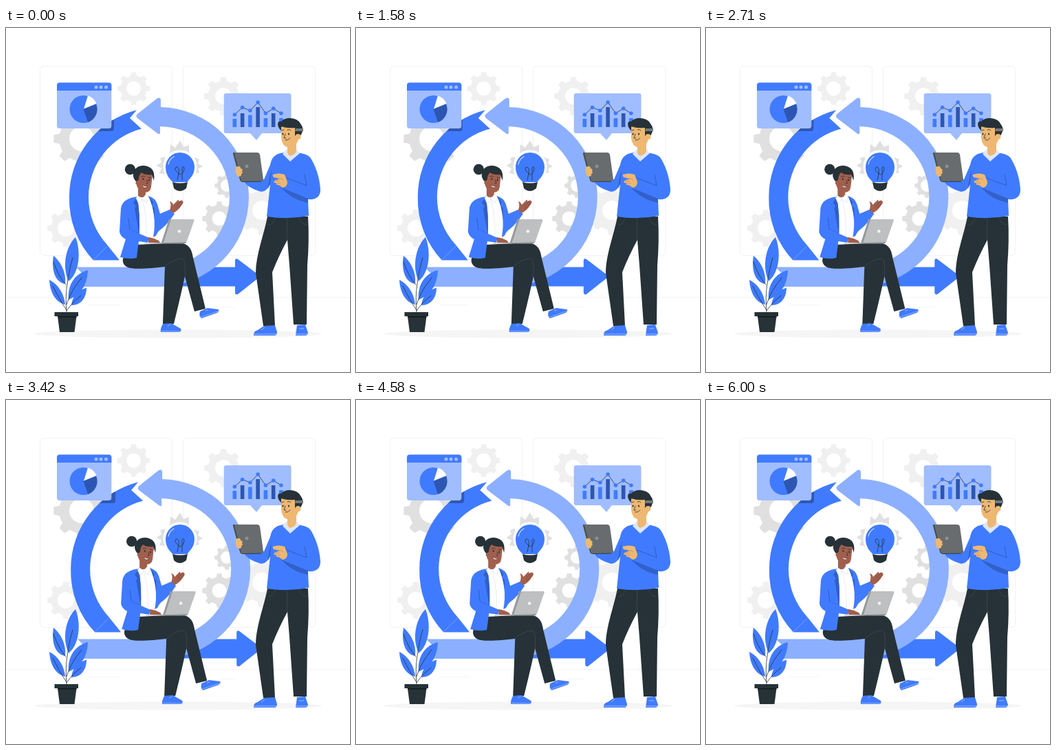
An HTML page that plays this animation: 500x500 px, repeating every 6040 ms.

```html
<!DOCTYPE html>
<html lang="en">
<head>
<meta charset="utf-8">
<title>Team process</title>
<style>
  html, body { margin: 0; width: 100%; height: 100%; overflow: hidden; background: #fff; }
  svg { display: block; width: 100%; height: 100%; }
  .blue { fill: #407bff; }
  .light { fill: #8cb0ff; }
  .pale { fill: #a0bdff; }
  .deep { fill: #2d56b3; }
  .ink { fill: #263238; }
  .white { fill: #fff; }
  .brown { fill: #a25f4d; }
  .tan { fill: #eeb872; }
  .line { fill: none; stroke: #263238; stroke-width: .8; stroke-linecap: round; stroke-linejoin: round; }
  .fold { stroke: #2d56b3; }
  .seam { stroke: #46525a; stroke-width: .6; }
</style>
</head>
<body>
<svg viewBox="0 0 500 500">
  <!-- Room -->
  <g fill="none" stroke="#f2f2f2">
    <rect x="49.5" y="55.5" width="192" height="275" rx="5"/>
    <rect x="257.5" y="55.5" width="192" height="275" rx="5"/>
    <path d="M0 391.5H500" stroke="#ebebeb" stroke-width=".6"/>
    <path d="M120 402.5H165M310 405.5H332" stroke="#f0f0f0" stroke-width=".6"/>
  </g>
  <g id="gears"></g>
  <ellipse cx="250" cy="444.5" rx="209" ry="6" fill="#f5f5f5"/>

  <!-- Idea bulb -->
  <g>
    <path fill="#e0e0e0" d="M238 182L239 169L246 174L253 163.500L258 173L266 170L266 182ZM231 187L224 189L226 195L218.500 200L226 204L223 211L232 213ZM274 188L281 191L279 197L286 201L279 205L281 210L273 212Z"/>
    <circle class="white" cx="253" cy="202" r="24.500"/>
    <path class="blue" d="M242.500 224C239 220 232 215 232 202A21 21 0 0 1 274 202C274 215 266 219 263.500 224Z"/>
    <path class="ink" d="M242 224Q253 227 264 224L262 233Q257 237 253 237Q248 237 244 233Z"/>
    <path class="line" d="M249 221L251 211C245 208 245 202 248 202C251 202 252 207 251 212C255 215 257 211 256 207C255 201 259 200 259 204C259 208 256 211 256 213L256 221"/>
    <path d="M236 198Q238 190 244 187" fill="none" stroke="#cfddff" stroke-width="1.200" stroke-linecap="round"/>
  </g>

  <g id="shaking">
    <!-- Cycle arrows -->
    <path class="blue" d="M222 347.500H333V338Q333 334 337 336L366 358Q369 361 366 364L337 387Q333 388 333 384V375.500H222Z"/>
    <path class="light" d="M102 347.500H222.500A102.500 102.500 0 0 0 325 245.500A102.500 102.500 0 0 0 224 143V152Q224 156 220 153L191 131Q188 128 191 125L220 102Q225 100 225 105V115A130.500 130.500 0 0 1 353 245.500A130.500 130.500 0 0 1 222.500 376H102L115 361Z"/>
    <path class="blue" d="M190 119.200L180 131L197 146.500A102.500 102.500 0 0 0 120 245.500A102.500 102.500 0 0 0 147 315L165 337.500H127A130.500 130.500 0 0 1 92 245.500A130.500 130.500 0 0 1 190 119.200Z"/>
    <path d="M147 317.500L127 337" stroke="#8cb0ff" stroke-width=".7"/>
    <path d="M138 146L153 135L157 133V146Q157 150 153 150H134Z" fill="#3058b4"/>

    <!-- Seated woman -->
    <g>
      <path class="ink" d="M190 315L253 312C266 314 270 321 272 334L290 408L274 412L260 361Q255 385 244 430H228L231 347C214 349 192 351 181 349C169 347 168 336 172 332Z"/>
      <path class="line seam" d="M231 347C239 339 256 331 259 338Q261 344 260 361"/>
      <path class="blue" d="M228 430L240 429L254 437Q256 442 251 442H225Q224 437 228 430Z"/>
      <path class="blue" d="M282 412L293 407L309 409Q311 413 304 415L284 422Q280 419 282 412Z"/>
      <path d="M226 440.500L254 441M282 420.500L309 411.500M235 433L239 431M290 411L294 410" stroke="#dce7ff" stroke-width=".5"/>

      <path class="white" d="M192 244L207 244Q217 262 217 284V304L190 308Z"/>
      <path class="brown" d="M192 230L203 233V243Q199 249 192 244Z"/>
      <path class="blue" d="M207 244Q217 247 220 256L224 270L238 264L245 270Q235 285 226 292Q221 295 218 302L214 304Q220 273 207 244Z"/>
      <path class="brown" d="M238 265Q241 257 238 252Q242 253 243 257L250 250Q252 249 251 252Q257 249 257 252Q259 253 255 258Q251 265 243 269Z"/>
      <path class="line" d="M247 259L254 252M248 262L256 255" style="stroke:#63372e;stroke-width:.5"/>
      <path class="blue" d="M191 245C179 247 169 250 167 263L165 296Q166 303 174 307L166 333Q180 337 190 334L194 303V272Z"/>
      <path class="deep" d="M191 245L185 254L189 259L187 262L194 302Q195 272 191 245ZM207 244L214 253L212 258L216 262V278Q214 258 207 244Z" opacity=".75"/>
      <path class="line fold" d="M178 276L180 293L192 298"/>
      <path class="blue" d="M180 293L208 305L206 312L174 307Z"/>
      <path class="brown" d="M207 304Q215 305 222 309L224 312L207 312Z"/>
      <path class="white" d="M192 244L198 249L193 256L189 247ZM203 242L207 245L205 254L198 249Z" stroke="#c9d2dc" stroke-width=".5"/>
      <path class="line" d="M199 251Q205 275 204 302" style="stroke:#d5d9de;stroke-width:.5"/>

      <circle class="ink" cx="180.500" cy="205.500" r="7.700"/>
      <path class="brown" d="M190 211Q202 202 213 213L211 231Q210 239 202 239Q193 238 190 229Z"/>
      <path class="ink" d="M190 224Q184 219 185 211C188 199 202 197 211 204Q217 209 215 222L212 213Q202 214 197 210Q193 214 193 220Z"/>
      <circle class="brown" cx="191.500" cy="225" r="3"/>
      <g class="ink"><ellipse cx="199.500" cy="219.500" rx="1" ry="1.500"/><ellipse cx="208" cy="221" rx="1" ry="1.500"/></g>
      <path class="line" d="M197 216Q200 214 202 216M207 217L211 218M205 221L206 226H204"/>
      <path class="white" d="M198 228Q202 231 206 230Q201 235 198 228Z" stroke="#512a25" stroke-width=".5"/>

      <path d="M237 278H272Q274 278 273.500 280L263 310Q262 312 259 312H226Z" fill="#bdbfc1"/>
      <path d="M237 278H240L229 312H226Z" fill="#95999b"/>
      <path d="M202 313L262 311Q262 313.500 258 313.500H203Q200 315 202 313Z" fill="#95999b"/>
      <circle cx="252" cy="295.500" r="2.300" fill="#f4f4f4"/>
    </g>
  </g>

  <!-- Browser window -->
  <rect class="pale" x="74" y="79.500" width="79.300" height="66.500" rx="4"/>
  <path class="blue" d="M74 91V83.500Q74 79.500 78 79.500H149.300Q153.300 79.500 153.300 83.500V91Z"/>
  <g class="pale"><circle cx="131" cy="86" r="2.500"/><circle cx="138" cy="86" r="2.500"/><circle cx="145.500" cy="86" r="2.500"/></g>
  <circle class="blue" cx="112.500" cy="118" r="20"/>
  <path class="white" d="M113 117.500L119 98.500A20 20 0 0 1 131.500 110Z"/>
  <path class="deep" d="M112.500 118L131 110.500A20 20 0 0 1 119 137Z"/>

  <!-- Chart bubble -->
  <path class="pale" d="M320 95H411Q414.500 95 414.500 98V150Q414.500 153 411 153H372L364 163L355 153H320Q316.700 153 316.700 150V98Q316.700 95 320 95Z"/>
  <g id="chart"></g>

  <!-- Plant -->
  <g>
    <path class="blue" d="M91 368C81 346 87 318 101 304C110 326 106 357 91 368ZM86 372C70 369 66 350 69 331C80 340 88 356 86 372ZM91 395C89 370 103 356 119 352C118 372 111 386 91 395ZM86 402C70 398 64 382 63 366C77 373 85 388 86 402ZM95 403C97 387 107 381 117 377.500C117 391 110 403 95 403Z"/>
    <path class="line" d="M88 413Q86 390 89 372Q92 350 97 334M69 340Q76 361 87 373M88 402Q94 382 110 363M68 375Q79 397 88 410M88 411Q97 398 109 389"/>
    <path class="ink" d="M70.500 413H105V419H70.500ZM75 419H102.500L99.500 442H78Z"/>
    <path d="M75 419H102.500V420.500H75Z" fill="#11191d"/>
  </g>

  <!-- Standing man -->
  <g>
    <path class="ink" d="M380 274H439Q441 310 438 345L437 431H418L412 345L409 308Q396 332 387 355L391 433H374L363 356C363 330 375 300 380 274Z"/>
    <path class="line seam" d="M409 277L408 301L409 308M382 286Q388 286 391 277M437 286Q430 286 426 277"/>
    <path class="blue" d="M375 433L391 432L394 442Q394 447 390 447H360Q359 441 366 439ZM423 432L435 431L439 443Q438 447 435 447H421Z"/>
    <path d="M360 445H394M421 445H438M371 439L376 435M426 437H433" stroke="#dce7ff" stroke-width=".6"/>

    <path class="blue" d="M403 181C391 183 386 188 384 199L375 220L347 224Q351 232 371 238Q379 238 384 227L379 274Q409 279 440 273L439 249C451 250 457 245 457 235C456 216 449 198 442 188Q438 183 423 181Z"/>
    <path class="deep" d="M400 232L439 248V254Q416 250 400 232ZM384 227L386 206Q382 219 381 234Z" opacity=".7"/>
    <path class="line fold" d="M434 213L437 229L408 218"/>
    <path d="M407 177L402 183L413 194L427 182L422 176Z" fill="#dce7ff"/>
    <path class="tan" d="M409 168L422 166V178Q421 184 413 186Q409 184 409 180Z"/>
    <path class="tan" d="M400 144Q411 137 424 146L425 162Q421 175 411 174Q401 172 400 160Z"/>
    <path class="ink" d="M400 149C393 143 394 134 400 136C406 128 424 130 428 139Q434 146 429 155L424 162L420 156V145Q408 146 400 143Z"/>
    <path d="M421 146H432V150H420Z" fill="#737b80"/>
    <circle class="tan" cx="424.500" cy="158" r="4"/>
    <g class="ink"><ellipse cx="402.500" cy="154" rx="1" ry="1.600"/><ellipse cx="411" cy="154" rx="1" ry="1.600"/></g>
    <path class="line" d="M400.500 149L404 148M409 148Q412 146 414 149M406 154L404 160H407M406 163Q410 164 413 160"/>

    <path d="M331 181H365Q368 181 369 184L374 220Q374 223 371 223L344 223Q341 223 340 220L330 184Q329 181 331 181Z" fill="#686c6e"/>
    <path d="M331 181L341 222Q342 223.500 345 223.500L371 223" fill="none" stroke="#30383d"/>
    <circle cx="350" cy="201" r="2.500" fill="#8d9194"/>
    <path class="tan" d="M334 202Q341 199 341 204Q345 205 343 208Q345 211 342 212Q343 215 339 216L335 214Q333 208 334 202Z"/>
    <path class="tan" d="M388 213Q397 210 405 213L409 224Q409 231 402 232L396 228Q392 229 393 225Q388 226 390 222L398 219L389 217Q387 214 388 213Z"/>
    <path class="line" d="M398 219Q402 218 402 221M391 223L397 222M394 226L399 225" style="stroke:#a46c42;stroke-width:.5"/>
  </g>
</svg>
<script>
  const byId = id => document.getElementById(id);

  function gear(cx, cy, r, hole, color, teeth = 8) {
    const body = r * 0.8, pitch = 2 * Math.PI / teeth;
    const point = (radius, angle) =>
      `${(cx + radius * Math.sin(angle)).toFixed(1)} ${(cy - radius * Math.cos(angle)).toFixed(1)}`;
    let outline = '';
    for (let i = 0; i < teeth; i++) {
      const corners = [[body, -.29], [r, -.17], [r, .17], [body, .29]];
      outline += corners.map(([radius, k], n) => {
        const to = point(radius, (i + k) * pitch);
        return n ? 'L' + to : i ? `A${body} ${body} 0 0 1 ${to}` : 'M' + to;
      }).join('');
    }
    const rim = `M${cx - hole} ${cy}a${hole} ${hole} 0 1 0 ${2 * hole} 0a${hole} ${hole} 0 1 0 ${-2 * hole} 0`;
    return `<path d="${outline}Z${rim}" fill="${color}" fill-rule="evenodd"/>`;
  }

  byId('gears').innerHTML = [
    gear(185.5, 88, 24, 10.5, '#f0f0f0'),
    gear(316, 99, 28, 12, '#f0f0f0'),
    gear(110, 161, 41, 18, '#e0e0e0'),
    gear(87, 291, 27, 12, '#f0f0f0'),
    gear(321, 229, 18, 9, '#e0e0e0'),
    gear(310, 277, 25, 10.5, '#e0e0e0'),
    gear(372, 265, 36, 14, '#f0f0f0')
  ].join('');

  const barTops = [132, 124, 126.5, 115, 131, 124, 131];
  const dotYs = [126, 115.5, 120, 108, 124, 117, 124];
  const chartX = i => 332.3 + i * 11.27;
  byId('chart').innerHTML =
    barTops.map((y, i) => `<rect class="${i % 2 ? 'deep' : 'blue'}" x="${chartX(i) - 2.8}" y="${y}" width="5.6" height="${144 - y}"/>`).join('') +
    `<polyline class="line" points="${dotYs.map((y, i) => chartX(i) + ',' + y).join(' ')}"/>` +
    dotYs.map((y, i) => `<circle class="blue" cx="${chartX(i)}" cy="${y}" r="2.8"/>`).join('');

  // Sideways shake: equally spaced stops joined by straight ramps.
  const LOOP = 6040, SWING = 6000, LEAD = 40;
  const stops = [0, -1, 2, -4, 4, -4, 4, -4, 2, -1, 0];
  const shaking = byId('shaking');

  function shift(time) {
    const at = ((time % LOOP + LEAD) / SWING % 1) * 10;
    const i = Math.floor(at);
    return stops[i] + (stops[i + 1] - stops[i]) * (at - i);
  }

  const start = performance.now();
  function draw(now) {
    shaking.setAttribute('transform', `translate(${shift(Math.max(0, now - start)).toFixed(3)} 0)`);
    requestAnimationFrame(draw);
  }
  draw(start);
</script>
</body>
</html>
```
